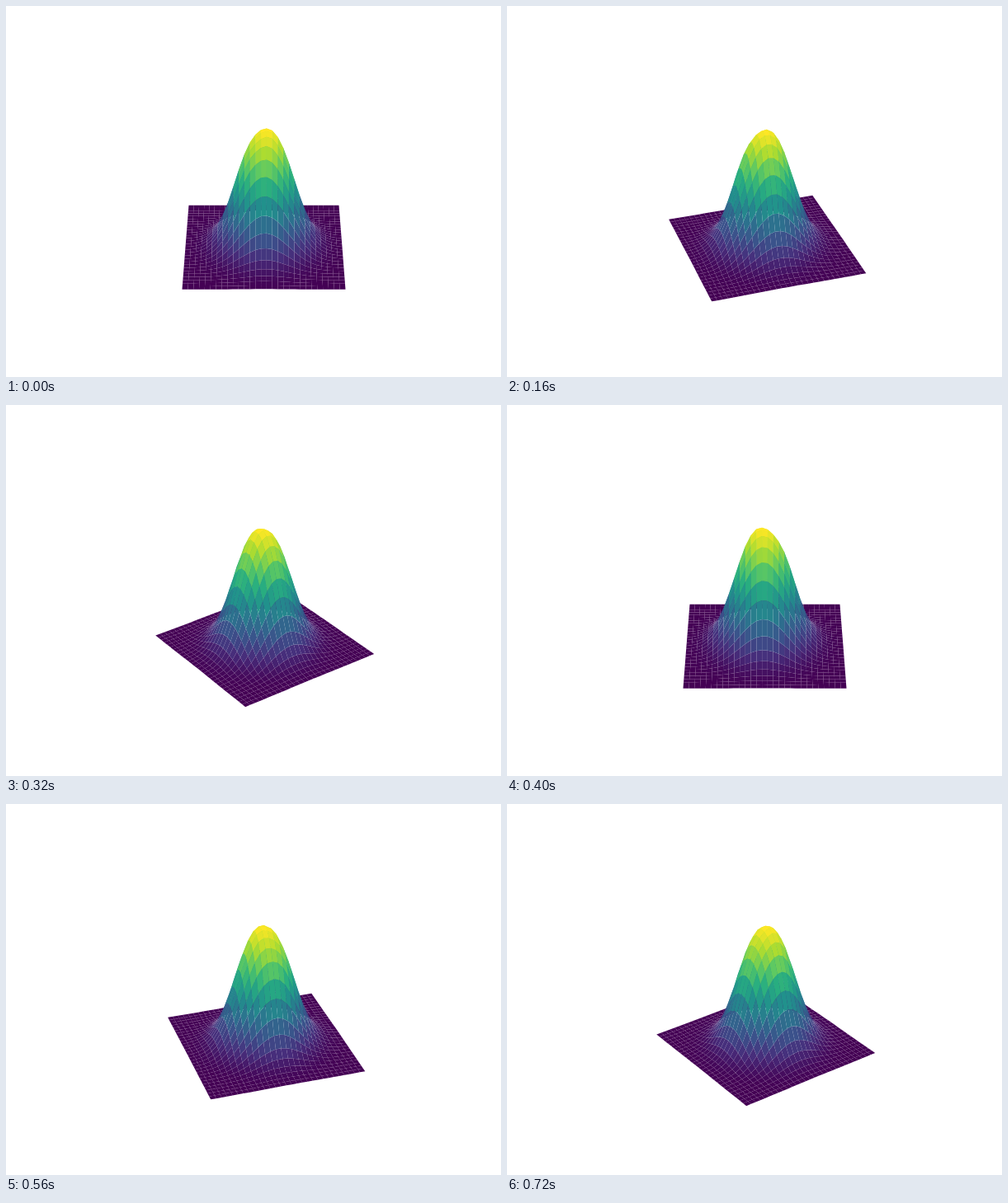
These frames come from a looping animation (600 px wide and 450 px high, 800 ms). An HTML page with a canvas:

```html
<!DOCTYPE html>
<html lang="en">
<head>
<meta charset="utf-8">
<title>Rotating surface</title>
<style>
  html, body { margin: 0; width: 600px; height: 450px; overflow: hidden; background: #fff; }
  canvas { display: block; }
</style>
</head>
<body>
<canvas id="stage" width="600" height="450"></canvas>
<script>
const ctx = document.getElementById('stage').getContext('2d');

const CELLS = 29;
const STEPS = 10, STEP_MS = 80;
const CENTER_X = 312.5, CENTER_Y = 208.5;
const FOCAL = 1944, DISTANCE = 10, ELEVATION = Math.PI / 6;
const VIRIDIS = ['440154', '472d7b', '3b528b', '2c728e', '21918c', '28ae80', '5ec962', 'addc30', 'fde725']
  .map(hex => [0, 2, 4].map(i => parseInt(hex.slice(i, i + 2), 16)));

// Falls to one half at the given radius; power 2 is a Gaussian, more is flatter on top
const bump = (x, y, cx, cy, radius, power = 2) =>
  0.5 ** ((Math.hypot(x - cx, y - cy) / radius) ** power);

// A broad bell, slightly dented beside its top and fuller on the shoulder below
const height = (x, y) =>
  -0.5 + 0.85 * bump(x, y, 0.005, 0.008, 0.2, 2.34)
  - 0.04 * bump(x, y, 0.05, -0.06, 0.06)
  + 0.035 * bump(x, y, 0.085, -0.115, 0.07);

function viridis(value) {
  const pos = Math.min(Math.max(value, 0), 1) * (VIRIDIS.length - 1);
  const i = Math.min(Math.floor(pos), VIRIDIS.length - 2);
  const rgb = VIRIDIS[i].map((c, k) => Math.round(c + (VIRIDIS[i + 1][k] - c) * (pos - i)));
  return `rgb(${rgb})`;
}

function vertex(i, j) {
  const x = i / CELLS - 0.5, y = j / CELLS - 0.5;
  return { x, y, z: height(x, y) };
}

const quads = [];
for (let i = 0; i < CELLS; i++) {
  for (let j = 0; j < CELLS; j++) {
    const corners = [vertex(i, j), vertex(i + 1, j), vertex(i + 1, j + 1), vertex(i, j + 1)];
    quads.push({ corners, mean: corners.reduce((sum, p) => sum + p.z, 0) / 4 });
  }
}
const means = quads.map(q => q.mean);
const low = Math.min(...means), high = Math.max(...means);
for (const quad of quads) quad.color = viridis((quad.mean - low) / (high - low));

function project({ x, y, z }, azimuth) {
  const c = Math.cos(azimuth), s = Math.sin(azimuth);
  const side = y * c - x * s, toward = x * c + y * s;
  const up = z * Math.cos(ELEVATION) - toward * Math.sin(ELEVATION);
  const depth = DISTANCE - toward * Math.cos(ELEVATION) - z * Math.sin(ELEVATION);
  const scale = FOCAL / depth;
  return { x: CENTER_X + side * scale, y: CENTER_Y - up * scale, depth };
}

function draw(azimuth) {
  ctx.fillStyle = '#fff';
  ctx.fillRect(0, 0, 600, 450);
  const faces = quads.map(({ corners, color }) => {
    const points = corners.map(p => project(p, azimuth));
    return { points, color, depth: points.reduce((sum, p) => sum + p.depth, 0) };
  });
  faces.sort((a, b) => b.depth - a.depth);
  // Antialiased neighbours leave the fine pale mesh between faces
  for (const { points, color } of faces) {
    ctx.fillStyle = color;
    ctx.beginPath();
    for (const p of points) ctx.lineTo(p.x, p.y);
    ctx.closePath();
    ctx.fill();
  }
}

let shown = -1;
function tick() {
  const step = Math.floor(performance.now() / STEP_MS) % STEPS;
  if (step !== shown) draw(step * 2 * Math.PI / STEPS);
  shown = step;
  requestAnimationFrame(tick);
}
tick();
</script>
</body>
</html>
```
